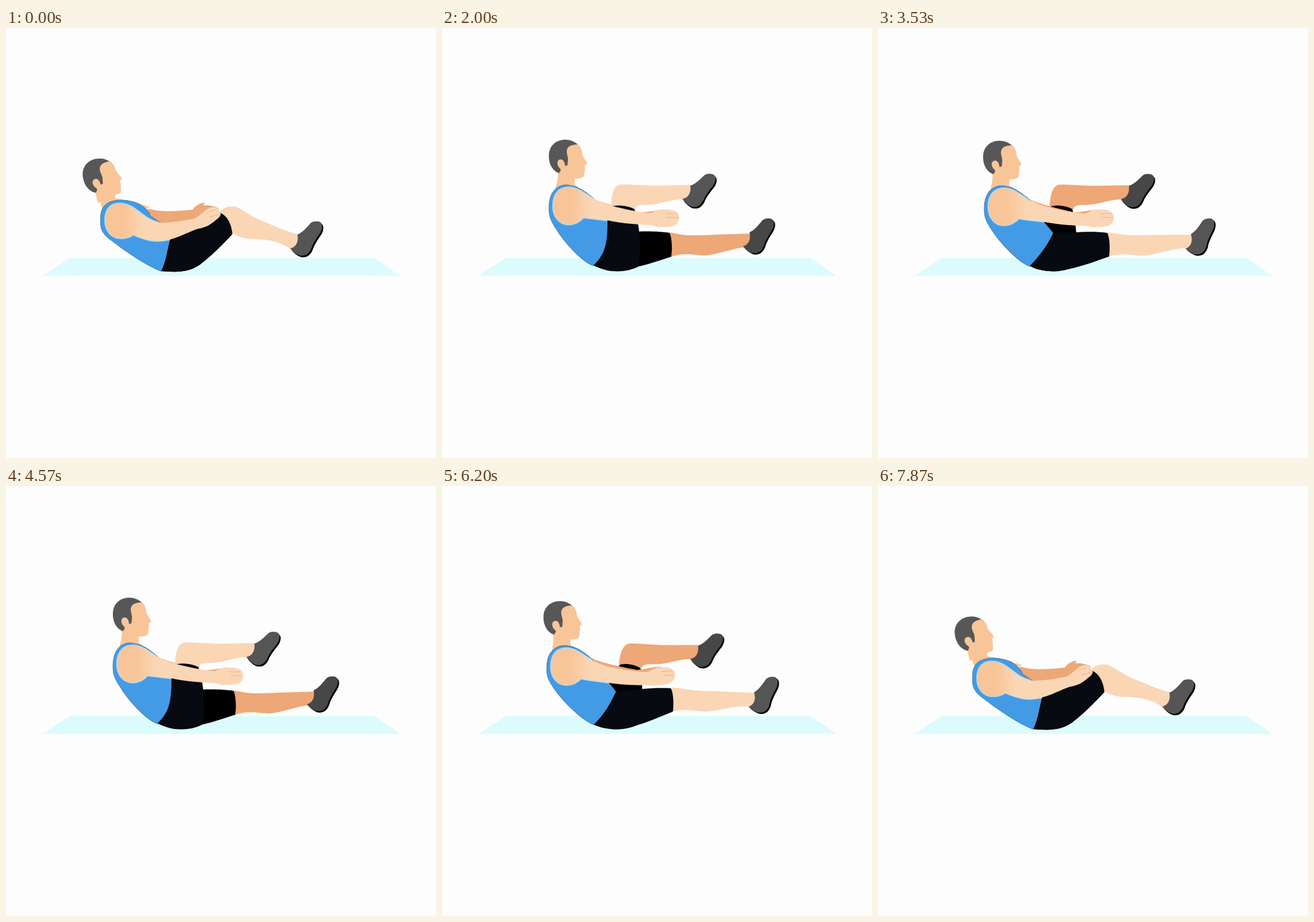
An HTML page with a canvas for the animation above (8000 ms loop, 720 by 720 pixels).

```html
<!DOCTYPE html>
<html lang="en">
<head>
<meta charset="utf-8">
<title>Leg exercise</title>
<style>
  html, body { margin: 0; height: 100%; overflow: hidden; background: #fdfdfd; }
  canvas { display: block; width: 100vw; height: 100vh; }
</style>
</head>
<body>
<canvas id="stage" width="720" height="720"></canvas>
<script>
const ctx = document.getElementById('stage').getContext('2d');
const LOOP = 8000, CYCLE = 2617;
const SKIN = '#fad6b5', WARM = '#f8c598', SHADED = '#eea777', BLUE = '#439be6', TRIM = '#a9dcf8';

// Each part has one outline per pose, all with the same commands.
const body = {
  neck: {
    rest: 'M150,268 C155,280 158,288 160,300 L200,310 L242,300 C225,295 200,288 183,285 L181,270Z',
    up: 'M194,236 C195,255 192,262 188,275 L215,285 L250,283 C240,276 228,266 222,262 L222,245Z'
  },
  torso: {
    rest: 'M159,312 C157,335 160,342 172,352 C200,374 236,398 260,407 C268,392 270,370 276,350 L265,330 C250,322 246,318 242,315 C238,305 226,294 212,291 C190,285 162,288 159,312Z',
    up: 'M180,292 C178,312 181,320 190,334 C205,360 236,392 254,398 C270,382 285,362 294,343 L276,322 C268,305 258,288 248,281 C242,276 228,266 215,264 C200,260 183,268 180,292Z'
  },
  farArm: {
    rest: 'M236,302 C262,310 290,306 313,304 C318,296 328,292 333,293 L330,297 C340,296 348,298 356,302 L350,320 L262,328 C250,322 240,315 236,302Z',
    up: 'M250,284 C265,292 300,302 330,309 C350,308 364,304 374,305 L376,306 C380,305 386,305 390,308 L380,320 L290,318 C270,312 256,300 250,284Z'
  },
  arm: {
    rest: 'M166,322 C166,303 176,294 190,294 C206,294 216,303 228,312 C238,320 250,326 260,326 C280,326 300,322 316,319 C328,312 334,303 342,301 C350,298 356,302 358,308 C362,312 357,318 352,321 C342,330 334,334 322,336 C310,340 298,346 290,349 C270,357 255,357 245,356 C232,354 222,350 213,346 C206,351 200,352 192,352 C176,352 166,338 166,322Z',
    up: 'M186,298 C186,276 198,267 212,267 C228,267 238,277 250,284 C262,290 275,295 285,298 C305,303 330,309 350,310 C358,306 364,303 372,304 C380,304 388,304 394,309 C399,314 397,324 394,327 C388,333 380,333 370,333 C360,335 354,330 348,330 C325,329 300,327 277,322 C262,320 248,319 237,317 C230,325 222,329 212,329 C196,329 186,315 186,298Z'
  },
  fingers: {
    rest: 'M337,309 L350,304 M340,317 L357,312',
    up: 'M374,311 L393,311 M376,317 L396,318'
  }
};

const leg = {
  shorts: {
    rest: 'M276,350 L330,328 C342,320 352,314 358,309 C370,314 378,328 379,345 C365,360 345,381 325,396 C305,410 285,409 260,407 C268,392 270,370 276,350Z',
    straight: 'M294,342 L330,343 C350,342 370,343 384,345 C388,352 389,372 387,385 C365,392 345,399 320,404 C300,409 272,409 254,398 C270,382 285,362 294,342Z',
    bent: 'M277,322 L282,310 C284,302 285,299 287,298 C297,296 312,298 322,303 C330,325 336,370 328,400 C310,409 278,412 254,397 C270,382 278,365 277,322Z'
  },
  shin: {
    rest: 'M357,309 C362,301 376,297 386,300 C398,306 410,316 430,324 C450,332 470,341 489,346 C493,354 491,367 478,371 C460,357 440,354 420,353 C400,353 388,350 378,342 C374,325 366,314 357,309Z',
    straight: 'M384,344 C390,345 396,347 404,348 C420,350 440,349 460,348 C480,347 505,347 524,346 C530,354 528,367 514,369 C495,369 470,380 445,383 C425,383 410,377 387,385 C389,370 388,355 384,344Z',
    bent: 'M283,299 C284,280 286,263 300,262 C320,262 345,264 360,264 C380,264 398,263 416,263 C421,272 419,285 405,287 C388,285 365,296 345,296 C335,297 325,294 324,304 C312,298 298,296 283,299Z'
  }
};

const mat = new Path2D('M61,415 L107,385 H617 L660,415Z');
// The shoe is drawn around the top of its cuff.
const shoe = new Path2D('M0,0 C8,-3 15,-11 22,-19 C26,-23 36,-23 39,-20 C43,-16 41,-8 38,-3 C32,6 26,14 23,24 C18,34 12,36 4,35 C-2,33 -8,28 -12,23 C-2,21 2,12 0,0Z');
const face = new Path2D('M195,243 L190,210 L212,190 L227,194 C233,199 235,206 235,212 C237,217 241,222 243,227 C242,229 239,229 239,231 C240,237 238,242 238,247 C237,251 232,252 223,252 L221,260 L196,260Z');
const hair = new Path2D('M196,243 C186,240 178,228 179,212 C180,196 192,187 206,187 C215,187 222,190 227,195 C219,195 212,197 210,202 C207,208 211,214 211,220 L210,230 L206,231 C206,225 203,220 199,220 C194,220 192,225 194,230 C195,234 199,235 199,238Z');

const numbers = path => path.match(/\d+/g).map(Number);

// Blends a rest outline towards other poses: [path, horizontal weight, vertical weight].
function morph(rest, ...poses) {
  const targets = poses.map(([path, ...weights]) => [numbers(path), weights]);
  let i = 0;
  return new Path2D(rest.replace(/\d+/g, text => {
    const start = +text;
    let value = start;
    for (const [coords, weights] of targets) value += weights[i % 2] * (coords[i] - start);
    i++;
    return value.toFixed(2);
  }));
}

function fill(path, color) {
  ctx.fillStyle = color;
  ctx.fill(path);
}

function ease(from, duration, time) {
  const u = Math.min(1, Math.max(0, (time - from) / duration));
  return u * u * (3 - 2 * u);
}

// Legs swing about the hip, so one axis runs ahead of the other.
const swing = weight => Math.sin(weight * Math.PI / 2);

function drawLeg(straight, bent, look) {
  const reach = swing(straight), lift = swing(bent);
  const shape = part => morph(part.rest, [part.straight, reach, straight], [part.bent, bent, lift]);
  ctx.save();
  ctx.translate(look.shift[0] * straight, look.shift[1] * straight);
  fill(shape(leg.shin), look.skin);
  fill(shape(leg.shorts), look.shorts);
  ctx.restore();

  const place = (i, rest, raised, a, b) => rest + a * (look.foot[i] - rest) + b * (raised - rest);
  ctx.save();
  ctx.translate(place(0, 488, 416, reach, bent), place(1, 346, 264, straight, lift));
  ctx.rotate(place(2, 0, 4, straight, bent) * Math.PI / 180);
  ctx.save();
  ctx.translate(2, 2.5);
  fill(shoe, '#000');
  ctx.restore();
  fill(shoe, look.shoe);
  ctx.restore();
}

function drawHead(up) {
  const down = 1 - up;
  ctx.save();
  ctx.translate(209 - 50 * down, 217 + 31 * down);
  ctx.rotate(-10 * down * Math.PI / 180);
  ctx.translate(-209, -217);
  fill(face, WARM);
  fill(hair, '#575757');
  ctx.restore();
}

function drawTorso(torso) {
  ctx.strokeStyle = '#50667a';
  ctx.lineWidth = 1.5;
  ctx.stroke(torso);
  fill(torso, BLUE);
}

function drawArm(arm, torso, up) {
  ctx.save();
  ctx.clip(torso);
  ctx.strokeStyle = TRIM;
  ctx.lineWidth = 3;
  ctx.stroke(arm);
  ctx.restore();
  const left = 166 + 20 * up;
  const shade = ctx.createLinearGradient(left + 32, 0, left + 64, 0);
  shade.addColorStop(0, WARM);
  shade.addColorStop(1, SKIN);
  fill(arm, shade);
}

const farLook = { skin: SHADED, shorts: '#000', shoe: '#474747', foot: [515, 342, -2], shift: [-3, -2] };
const nearLook = { skin: SKIN, shorts: '#070a10', shoe: '#555556', foot: [524, 345, -8], shift: [0, 0] };

function draw(now) {
  const time = now % LOOP % CYCLE;
  const farRaise = ease(205, 430, time) - ease(851, 430, time);
  const nearRaise = ease(1515, 420, time) - ease(2205, 410, time);
  const up = farRaise + nearRaise;
  const shape = part => morph(part.rest, [part.up, up, up]);
  const torso = shape(body.torso);

  ctx.fillStyle = '#fdfdfd';
  ctx.fillRect(0, 0, 720, 720);
  fill(mat, '#dcfbfd');
  drawLeg(nearRaise, farRaise, farLook);
  fill(shape(body.farArm), SHADED);
  fill(shape(body.neck), WARM);
  drawTorso(torso);
  drawHead(up);
  drawLeg(farRaise, nearRaise, nearLook);
  drawArm(shape(body.arm), torso, up);
  ctx.strokeStyle = '#e9b48a';
  ctx.lineWidth = 1;
  ctx.stroke(shape(body.fingers));
}

const began = performance.now();
function tick() {
  draw(performance.now() - began);
  requestAnimationFrame(tick);
}
tick();
</script>
</body>
</html>
```
